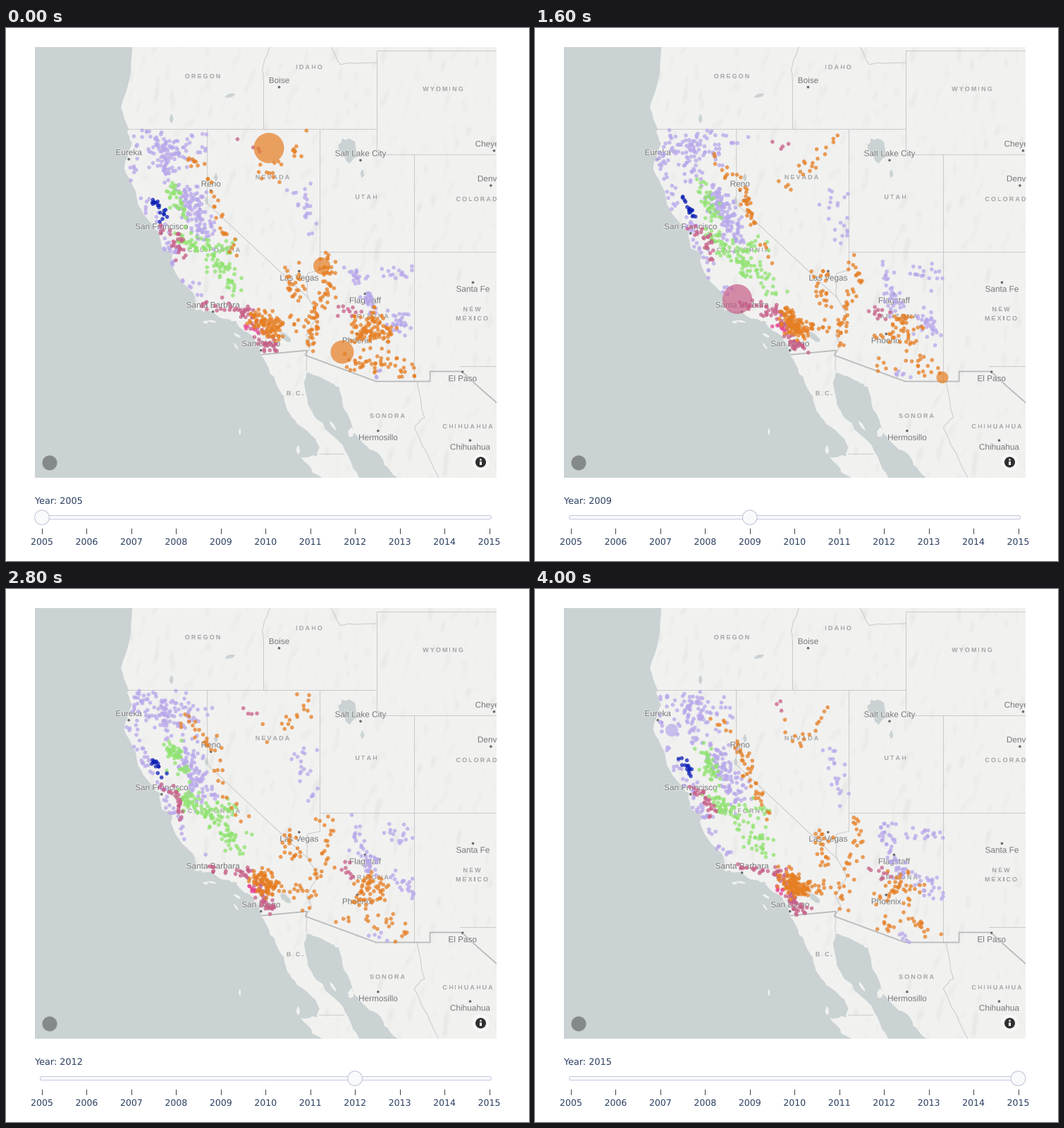
Write a matplotlib script that moves like this. It is 742 px wide and 755 px high and loops after 4.4 s.

```python
import numpy as np
import matplotlib.pyplot as plt
from matplotlib.animation import FuncAnimation
from matplotlib.colors import to_rgba
from matplotlib.patches import Circle, FancyBboxPatch, PathPatch, Polygon, Rectangle
from matplotlib.path import Path
from matplotlib.textpath import TextPath
from matplotlib.transforms import Affine2D

W, H, DPI = 742, 755, 100
PX = 72 / DPI  # points per pixel
LEFT, TOP, RIGHT, BOTTOM = 41, 27, 696, 637
YEARS = range(2005, 2016)
STEP = 63.45
DEGREE = 26.8  # pixels per degree of longitude

WATER, LAND = "#cad2d3", "#f1f1f0"
INK = "#2a3f5f"
LAVENDER, LIME, ROSE = "#b8a7ea", "#8fe36f", "#c75f88"
MAGENTA, AMBER, NAVY = "#e84393", "#e67e22", "#0a1eb4"

# Longitude and latitude of headlands and bays
US_COAST = [
    (-123.97, 45.2), (-124.12, 43.9), (-124.56, 42.84), (-124.2, 42), (-124.06, 41.4),
    (-124.41, 40.44), (-123.8, 39.5), (-123.7, 38.93), (-123, 38.2), (-122.55, 37.82),
    (-122.4, 37.12), (-121.85, 36.95), (-121.95, 36.5), (-121.3, 35.67), (-120.65, 35.1),
    (-120.6, 34.5), (-119.7, 34.4), (-119.2, 34.1), (-118.5, 34.02), (-118.35, 33.75),
    (-117.7, 33.46), (-117.27, 32.9), (-117.12, 32.53)]
BAJA_COAST = [
    (-116.65, 31.75), (-116.05, 30.8), (-115.8, 30), (-115.19, 29.43), (-114.27, 28.67),
    (-114.05, 28.3), (-114.2, 27.9), (-115.05, 27.83), (-114.4, 27.15), (-113.6, 26.7)]
GULF_COAST = [
    (-111.85, 26.7), (-112.27, 27.34), (-112.85, 28.4), (-113.5, 28.95), (-114.4, 29.8),
    (-114.65, 30.3), (-114.85, 31.2), (-114.75, 31.75), (-114.4, 31.62), (-113.55, 31.3),
    (-113.05, 31.1), (-112.75, 30.1), (-112.2, 28.95), (-111.6, 28.4), (-110.9, 27.92),
    (-110.5, 27.4), (-109.8, 26.7)]

STRAIGHT_BORDERS = [
    [(-124.2, 42), (-111.05, 42)], [(-117.03, 42), (-117.03, 43.9)],
    [(-104, 45), (-111.05, 45), (-111.05, 41), (-104, 41)],
    [(-120, 42), (-120, 39), (-114.63, 35)], [(-114.04, 42), (-114.04, 36.2)],
    [(-114.04, 37), (-104, 37)], [(-109.05, 41), (-109.05, 31.33)],
    [(-106.62, 32), (-104, 32)], [(-114.1, 28), (-112.8, 28)]]
WINDING_BORDERS = [
    [(-117.03, 43.9), (-117.1, 44.4), (-116.5, 45.3)],
    [(-113.5, 45.2), (-113, 44.5), (-111.05, 44.55)],
    [(-114.04, 36.2), (-114.74, 36.1), (-114.63, 35), (-114.14, 34.3), (-114.72, 33.4),
     (-114.5, 33), (-114.8, 32.5), (-114.75, 31.8)],
    [(-108.9, 31.33), (-108.55, 29.7), (-109, 29.2), (-108.6, 28.4), (-107.7, 26.8)]]
FRONTIER = [(-117.12, 32.53), (-114.72, 32.72), (-114.81, 32.5), (-111.07, 31.33),
            (-108.21, 31.33), (-108.21, 31.78), (-106.53, 31.78), (-105.6, 31.05), (-104.6, 30.3)]

# Islands and lakes: longitude, latitude, width, height, tilt
ISLANDS = [(-120.1, 33.97, 8, 4, 0), (-119.75, 34, 13, 3, 10), (-118.42, 33.38, 11, 4, 30),
           (-118.48, 32.9, 11, 3, 55), (-118.28, 29.03, 3, 9, 0), (-115.2, 28.17, 5, 12, 0),
           (-112.4, 29, 9, 12, 0), (-113.35, 29.3, 15, 4, 55)]
LAKES = [(-112.5, 41.17, 25, 36, -25), (-111.8, 40.2, 5, 11, 0), (-115.85, 33.3, 22, 8, 45),
         (-120.04, 39.1, 5, 11, 0), (-119.55, 40.05, 5, 11, 0), (-118.8, 43.3, 14, 5, -15),
         (-121.9, 42.4, 6, 11, 0)]

REGIONS = [
    ("OREGON", 279, 68), ("IDAHO", 430, 55), ("WYOMING", 620, 86), ("NEVADA", 378, 211),
    ("UTAH", 511, 239), ("COLORADO", 672, 242), ("CALIFORNIA", 295, 314),
    ("ARIZONA", 516, 408), ("NEW", 661, 398), ("MEXICO", 661, 411), ("B.C.", 410, 517),
    ("SONORA", 541, 549), ("CHIHUAHUA", 655, 564)]
NAMED_ABOVE = [
    ("Boise", -116.2, 43.62), ("Eureka", -124.16, 40.8), ("Salt Lake City", -111.89, 40.76),
    ("Cheyenne", -104.82, 41.14), ("Denver", -104.99, 39.74), ("Reno", -119.81, 39.53),
    ("San Francisco", -122.42, 37.77), ("Santa Barbara", -119.7, 34.42),
    ("San Diego", -117.16, 32.72)]
NAMED_BELOW = [
    ("Las Vegas", -115.14, 36.17), ("Flagstaff", -111.65, 35.2), ("Phoenix", -112.07, 33.45),
    ("Santa Fe", -105.94, 35.69), ("El Paso", -106.49, 31.76), ("Hermosillo", -110.96, 29.07),
    ("Chihuahua", -106.09, 28.63)]

# Marker swarms: colour, spread, count, key points of the spine
SWARMS = [
    (LAVENDER, 14, 70, [(188, 165), (268, 172)]),
    (LAVENDER, 7, 42, [(222, 158), (227, 212)]),
    (LAVENDER, 9, 105, [(252, 230), (288, 297)]),
    (LAVENDER, 8, 22, [(418, 225), (438, 302)]),
    (LAVENDER, 6, 45, [(495, 330), (508, 380), (522, 402)]),
    (LAVENDER, 7, 17, [(535, 350), (577, 348)]),
    (LAVENDER, 8, 28, [(550, 410), (574, 430)]),
    (LAVENDER, 4, 6, [(512, 490), (540, 494)]),
    (LIME, 6, 42, [(234, 220), (254, 264)]),
    (LIME, 6, 52, [(250, 292), (268, 311), (325, 312)]),
    (LIME, 8, 62, [(282, 312), (332, 372)]),
    (ROSE, 4, 24, [(216, 280), (242, 292), (250, 326)]),
    (ROSE, 5, 30, [(280, 394), (335, 400), (350, 408)]),
    (ROSE, 5, 42, [(354, 414), (366, 444), (382, 456)]),
    (ROSE, 5, 9, [(475, 398), (502, 405)]),
    (ROSE, 6, 4, [(340, 165), (360, 178)]),
    (MAGENTA, 2, 6, [(340, 421), (357, 430)]),
    (AMBER, 7, 105, [(355, 405), (368, 422), (386, 426)]),
    (AMBER, 5, 38, [(255, 184), (292, 222), (306, 275), (334, 335)]),
    (AMBER, 11, 18, [(365, 215), (400, 185), (425, 160)]),
    (AMBER, 7, 22, [(403, 340), (411, 388)]),
    (AMBER, 6, 8, [(395, 422), (430, 426)]),
    (AMBER, 6, 50, [(452, 322), (460, 365), (438, 400), (430, 455)]),
    (AMBER, 9, 66, [(498, 445), (520, 410), (542, 440)]),
    (AMBER, 8, 34, [(480, 478), (540, 472), (570, 490)]),
    (NAVY, 3, 16, [(207, 240), (216, 252), (224, 270)])]

# Large bubbles: colour, x, y, radius
BUBBLES = {
    2005: [(AMBER, 373, 170, 21.5), (AMBER, 477, 459, 16.5), (AMBER, 448, 337, 12)],
    2006: [(AMBER, 391, 163, 10), (AMBER, 417, 156, 8), (AMBER, 379, 410, 17),
           (LAVENDER, 315, 404, 11.5), (ROSE, 375, 454, 9)],
    2007: [(ROSE, 363, 168, 9.5), (AMBER, 378, 189, 11.5), (AMBER, 359, 217, 13.5)],
    2009: [(ROSE, 287, 384, 21), (AMBER, 578, 495, 8.5)],
    2011: [(AMBER, 387, 180, 23), (AMBER, 575, 485, 33), (LAVENDER, 522, 493, 17.5)],
    2013: [(LAVENDER, 266, 243, 13), (AMBER, 372, 423, 13)],
    2015: [(LAVENDER, 194, 200, 9)]}

fig = plt.figure(figsize=(W / DPI, H / DPI), dpi=DPI, facecolor="white")
ax = fig.add_axes([0, 0, 1, 1])
ax.axis("off")
frame = Rectangle((LEFT, TOP), RIGHT - LEFT, BOTTOM - TOP, color=WATER, lw=0)
ax.add_patch(frame)


def project(places):
    """Mercator position in pixels, anchored on the 42nd parallel."""
    lon, lat = np.array(places, float).T
    north = np.arcsinh(np.tan(np.radians(lat))) - np.arcsinh(np.tan(np.radians(42)))
    return np.column_stack([503 + DEGREE * (lon + 111.89), 143 - np.degrees(DEGREE * north)])


def along(points, t):
    """Points of a polyline, t counted in segments."""
    knots = np.arange(len(points))
    return np.column_stack([np.interp(t, knots, column) for column in np.transpose(points)])


def rough(points, seed=0, amount=0.9, parts=4):
    """Subdivide a polyline and shake the new points a little."""
    line = along(points, np.arange((len(points) - 1) * parts + 1) / parts)
    line[1:-1] += np.random.default_rng(seed).normal(0, amount, (len(line) - 2, 2))
    return line


def blob(lon, lat, width, height, tilt):
    angle = np.linspace(0, 2 * np.pi, 18, endpoint=False)
    radius = np.random.default_rng(width).uniform(.38, .58, 18)
    shape = np.column_stack([width * radius * np.cos(angle), height * radius * np.sin(angle)])
    return Affine2D().rotate_deg(tilt).translate(*project([(lon, lat)])[0]).transform(shape)


def glyphs(text, size, family, weight="normal"):
    return TextPath((0, 0), text, size=size, prop=dict(family=family, weight=weight))


def advance(text, *font):
    return glyphs(text + "|", *font).get_extents().x1 - glyphs("|", *font).get_extents().x1


def put(path, x, y, color, **style):
    path = path.transformed(Affine2D().scale(1, -1).translate(x, y))
    patch = ax.add_patch(PathPatch(path, fc=color, **{"lw": 0, "zorder": 5, **style}))
    if y < BOTTOM:
        patch.set_clip_path(frame)
    return patch


def put_centred(text, x, y, color, *font, **style):
    put(glyphs(text, *font), x - advance(text, *font) / 2, y, color, **style)


def put_tracked(text, x, y, gap=2.1):
    font = (9, "Liberation Sans", "bold")
    widths = [advance(c, *font) for c in text]
    x -= (sum(widths) + gap * (len(text) - 1)) / 2
    for char, width in zip(text, widths):
        put(glyphs(char, *font), x, y + 3.3, "#a3a4a5")
        x += width + gap


def put_city(name, place, label_shift):
    x, y = project([place])[0]
    font = (11.8, "Liberation Sans")
    base = y + label_shift + 4.2
    put_centred(name, x, base, LAND, *font, ec=LAND, lw=2 * PX, alpha=.6, zorder=4)
    put_centred(name, x, base, "#77787a", *font)
    ax.add_patch(Circle((x, y), 2.1, fc="#68696b", ec=LAND, lw=.6 * PX, zorder=5))


def draw_relief(clip):
    """Faint hill shading from smoothed noise lit from the north-west."""
    rows, cols = BOTTOM - TOP, RIGHT - LEFT
    noise = np.random.default_rng(4).normal(size=(rows, cols))
    fy, fx = np.fft.fftfreq(rows)[:, None], np.fft.fftfreq(cols)
    blur = np.exp(-2 * np.pi ** 2 * ((7 * fy) ** 2 + (4 * fx) ** 2))
    height = np.fft.ifft2(np.fft.fft2(noise) * blur).real
    slope = height - np.roll(height, (2, 2), (0, 1))
    shade = np.full((rows, cols, 4), .35)
    shade[..., 3] = np.clip(slope / slope.std() - .8, 0, 2) * .025
    image = ax.imshow(shade, extent=(LEFT, RIGHT, BOTTOM, TOP), aspect="auto", zorder=2)
    image.set_clip_path(clip)


def draw_map():
    outline = np.vstack([rough(project(US_COAST + BAJA_COAST), 1), rough(project(GULF_COAST), 2),
                         [(W, BOTTOM), (W, TOP - 5)]])
    land = ax.add_patch(Polygon(outline, fc=LAND, lw=0, zorder=1))
    land.set_clip_path(frame)
    draw_relief(land)
    for shapes, color in ((ISLANDS, LAND), (LAKES, WATER)):
        for shape in shapes:
            ax.add_patch(Polygon(blob(*shape), fc=color, lw=0, zorder=2.5))
    lines = [project(b) for b in STRAIGHT_BORDERS] + [rough(project(b)) for b in WINDING_BORDERS]
    for line in lines:
        ax.plot(*line.T, color="#c9caca", lw=PX, zorder=3)[0].set_clip_path(frame)
    ax.plot(*project(FRONTIER).T, color="#b9babb", lw=1.8 * PX, zorder=3)[0].set_clip_path(frame)
    for region in REGIONS:
        put_tracked(*region)
    for cities, shift in ((NAMED_ABOVE, -10), (NAMED_BELOW, 9)):
        for name, *place in cities:
            put_city(name, place, shift)


def draw_controls():
    ax.add_patch(Circle((62, 616), 10.5, fc="#85898a", lw=0, zorder=8))
    ax.add_patch(Circle((673.5, 615), 12, fc="white", alpha=.5, lw=0, zorder=8))
    ax.add_patch(Circle((673.5, 615), 7.5, fc="#2f3030", lw=0, zorder=9))
    ax.add_patch(Circle((673.5, 611.6), 1.3, fc="white", lw=0, zorder=10))
    ax.add_patch(Rectangle((672.4, 613.8), 2.2, 5.4, fc="white", lw=0, zorder=10))
    ax.add_patch(FancyBboxPatch((51, 693), 635, .5, boxstyle="round,pad=2.4", fc="#f8fafc",
                                ec="#c3c6dc", lw=PX, zorder=8))
    for i, year in enumerate(YEARS):
        x = 51 + STEP * i
        ax.plot([x, x], [709, 716], color="#444444", lw=PX, zorder=8)
        put_centred(str(year), x, 732, INK, 12.5, "DejaVu Sans")


def markers_of(year):
    """Positions, radii and colours of all markers of one year."""
    rng = np.random.default_rng(year)
    shore = us_shore[(us_shore[:, 1] > 145) & (us_shore[:, 1] < 380)]
    coastal = along(shore, rng.uniform(0, len(shore) - 1, 60))
    groups = [(LAVENDER, coastal + rng.normal((9, 0), 5, coastal.shape))]
    for color, spread, count, spine in SWARMS:
        in_desert = color == AMBER and spine[0][0] > 430
        level = .75 + .75 * np.exp(2005 - year) if in_desert else 1
        n = round(count * level * rng.uniform(.8, 1.2))
        spots = along(spine, rng.uniform(0, len(spine) - 1, n))
        groups.append((color, spots + rng.normal(0, spread, spots.shape)))
    rows = [(x, y, 2.8, to_rgba(color, .75)) for color, spots in groups
            for x, y in spots[states.contains_points(spots)]]
    rows += [(x, y, r, to_rgba(color, .7)) for color, x, y, r in BUBBLES.get(year, [])]
    x, y, radii, colors = zip(*rows)
    return np.column_stack([x, y]), np.array(radii), colors


def caption_path(year):
    flip = Affine2D().scale(1, -1).translate(41, 674)
    return glyphs(f"Year: {year}", 12.8, "DejaVu Sans").transformed(flip)


us_shore = rough(project(US_COAST), 1)
states = Path(np.vstack([
    us_shore[us_shore[:, 1] >= 143], project(FRONTIER[1:4]),
    project([(-109.03, 31.33), (-109.03, 37), (-114.04, 37), (-114.04, 42)])]))
draw_map()
draw_controls()
markers = ax.scatter([], [], linewidths=0, zorder=6)
grip = ax.add_patch(Circle((51, 693.3), 10.3, fc="#f8fafc", ec="#bfc2d6", lw=PX, zorder=9))
caption = ax.add_patch(PathPatch(caption_path(YEARS[0]), fc=INK, lw=0, zorder=5))
ax.set(xlim=(0, W), ylim=(H, 0))


def update(i):
    spots, radii, colors = markers_of(YEARS[i])
    markers.set_offsets(spots)
    markers.set_sizes((2 * radii * PX) ** 2)
    markers.set_facecolor(colors)
    grip.center = (51 + STEP * i, 693.3)
    caption.set_path(caption_path(YEARS[i]))
    return markers, grip, caption


animation = FuncAnimation(fig, update, frames=len(YEARS), interval=400, repeat=True)
plt.show()
```
